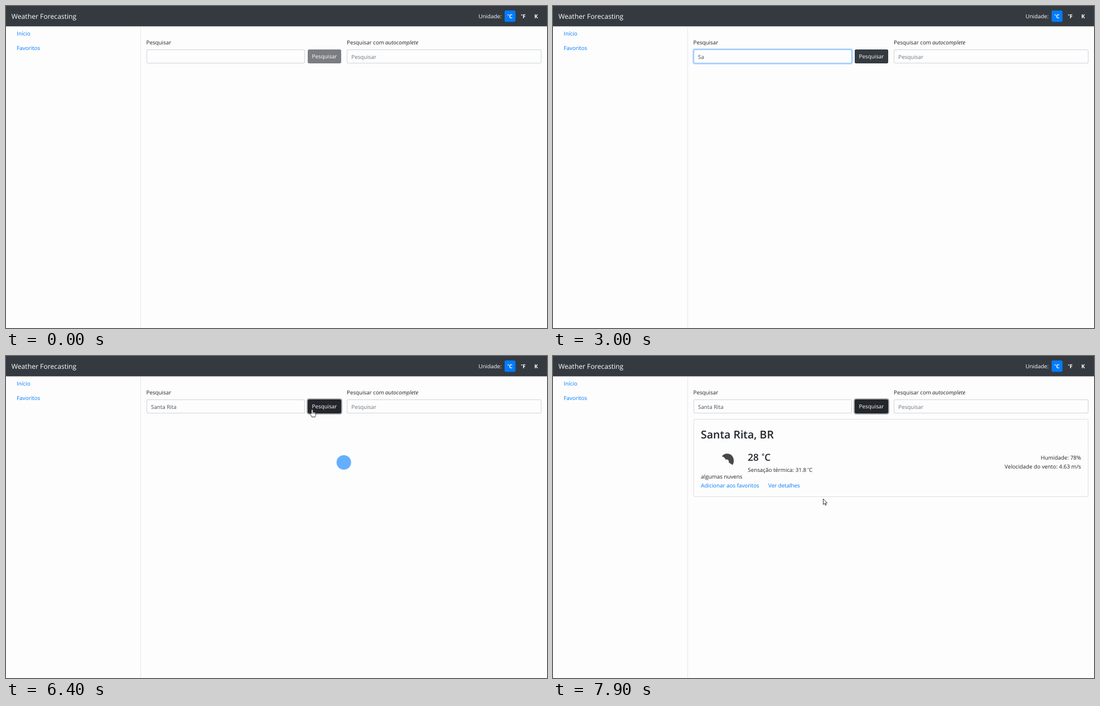
Recreate the animation shown at these times as an HTML page with a canvas. Size 970 px wide and 578 px high, loop 8 s.

```html
<!DOCTYPE html>
<html lang="pt">
<head>
<meta charset="utf-8">
<title>Weather Forecasting</title>
<style>
  html, body { margin: 0; width: 100%; height: 100%; overflow: hidden; background: #fdfdfd; }
  canvas { display: block; }
</style>
</head>
<body>
<canvas id="stage" width="970" height="578"></canvas>
<script>
const ctx = document.getElementById('stage').getContext('2d');
const LOOP = 8000, STEP = 100;
const BODY = 9.8;
const INK = '#212529', DARK = '#343a40', BLUE = '#007bff', PAGE = '#fdfdfd';

const TYPING = [
  [2400, 'S'], [2500, 'Sa'], [3500, 'S'], [3700, 'San'], [3800, 'Santa'], [4000, 'Santa '],
  [4200, 'Santa R'], [4300, 'Santa Ri'], [4400, 'Santa Rit'], [4500, 'Santa Rita']
];

// time, x, y, shape
const POINTER = [
  [0, 10.5, -11.3, 'arrow'], [400, 10.5, -11.3, 'arrow'], [600, 50, 50, 'arrow'],
  [800, 160, 140, 'arrow'], [1000, 290, 176, 'arrow'], [1200, 364, 120, 'arrow'],
  [1300, 361.5, 95, 'arrow'], [1400, 362, 91, 'beam'], [2400, 362, 91, 'none'],
  [5800, 624, 98, 'arrow'], [5900, 578, 98, 'hand'], [6000, 545, 97, 'hand'],
  [6100, 549, 96, 'hand'], [6600, 549, 96, 'hand'], [6700, 538, 112, 'arrow'],
  [6900, 504, 172, 'arrow'], [7100, 486, 210, 'arrow'], [7300, 486, 246, 'arrow'],
  [7400, 486, 246, 'arrow'], [7600, 486, 251, 'arrow'], [7800, 486, 251, 'arrow'],
  [7900, 484, 256, 'arrow'], [8000, 484, 256, 'arrow']
];

const HAND = 'M-1.3 8V1.2C-1.3-.3 1.2-.3 1.2 1.2V5C1.6 4.2 3 4.4 3.2 5.4' +
  'C3.7 4.8 4.9 5 5 6C5.6 5.6 6.4 6 6.4 7V9.6C6.4 11 5.4 11.6 5.3 13.4H-.8' +
  'C-.8 11.6-2.8 10.4-3.8 8.2C-4.2 7-2.8 6.4-2 7.3Z';
const ARROW = 'M.5.5V10.6L2.9 8.5L4.5 12L6 11.3L4.5 7.9H7.5Z';
const CLOUD = 'M303 180.3C306 174.5 316 173.5 321 179C325 184 325 191 322 195.5' +
  'L315.2 191.2C316 187.5 313 184.7 309.8 186.3C308.5 183 306 181 303 180.3Z';

const clamp = v => Math.max(0, Math.min(1, v));
const ramp = (t, start) => clamp((t - start + 60) / 150);

function text(str, x, y, color = INK, { size = BODY, weight = 400, style = 'normal', align = 'left' } = {}) {
  ctx.font = `${style} ${weight} ${size}px "Open Sans", "Noto Sans", sans-serif`;
  ctx.textAlign = align;
  ctx.fillStyle = color;
  ctx.fillText(str, x, y);
}

function unit(letter, x, y, color, size = BODY, weight = 400) {
  text('°', x, y - size * 0.22, color, { size: size * 0.72, weight });
  text(letter, x + size * 0.3, y, color, { size, weight });
}

function box(x, y, w, h, fill, r = 2.7) {
  ctx.beginPath();
  ctx.roundRect(x, y, w, h, r);
  ctx.fillStyle = fill;
  ctx.fill();
}

function outlined(x, y, w, h, border, fill = PAGE) {
  box(x, y, w, h, border);
  box(x + 1, y + 1, w - 2, h - 2, fill, 1.8);
}

function faded(alpha, draw) {
  if (alpha <= 0) return;
  ctx.save();
  ctx.globalAlpha = alpha;
  draw();
  ctx.restore();
}

function drawChrome() {
  ctx.fillStyle = PAGE;
  ctx.fillRect(0, 0, 970, 578);
  ctx.fillStyle = DARK;
  ctx.fillRect(0, 0, 970, 36.5);
  ctx.fillStyle = '#e3e6e8';
  ctx.fillRect(241, 37, 1, 541);

  text('Weather Forecasting', 9.7, 23.3, '#fff', { size: 12.2 });
  text('Unidade:', 847.3, 22.2, '#fff');
  box(894, 8, 19.5, 20.5, BLUE);
  unit('C', 899, 22.2, '#fff', BODY, 700);
  unit('F', 923.3, 22.2, '#fff', BODY, 700);
  text('K', 947.3, 22.2, '#fff', { weight: 700 });

  text('Início', 19.3, 53.3, BLUE);
  text('Favoritos', 19.3, 79.3, BLUE);
  text('Pesquisar', 251.5, 69, INK);
  text('Pesquisar com', 611, 69, INK);
  text('autocomplete', 680, 69, INK, { style: 'italic' });
  outlined(611, 78, 349, 25, '#ced4da');
  text('Pesquisar', 619.3, 94.7, '#6c757d');
}

function drawField(t) {
  outlined(252, 78, 284, 25, '#ced4da');
  const focus = ramp(t, 2000) * (1 - ramp(t, 6300));
  faded(focus, () => {
    box(250, 76, 288, 29, '#bfddfe', 4.5);
    outlined(252, 78, 284, 25, '#80bdff');
  });

  const entry = TYPING.filter(k => k[0] <= t).pop();
  const value = entry ? entry[1] : '';
  text(value, 260, 94.7, '#495057');

  const lastInput = Math.max(2000, entry ? entry[0] : 0);
  const blinkOn = Math.floor((t - lastInput) / 500) % 2 === 0;
  if (t >= 2000 && t < 6300 && blinkOn) {
    ctx.fillStyle = '#222';
    ctx.fillRect(Math.floor(260.5 + ctx.measureText(value).width), 84, 1, 14);
  }
}

function drawButton(t) {
  box(541, 78, 60, 25, '#7a7e82');
  faded(ramp(t, 2400), () => box(541, 78, 60, 25, DARK));
  faded(ramp(t, 6300), () => box(539, 76, 64, 29, '#a7aaac', 4.5));
  faded(ramp(t, 6100), () => outlined(541, 78, 60, 25, '#1d2124', '#23272b'));
  text('Pesquisar', 548.6, 94.3, '#fff');
}

function easeInOut(p) {
  // cubic-bezier(.42, 0, .58, 1) solved for its parameter
  let lo = 0, hi = 1;
  for (let i = 0; i < 24; i++) {
    const u = (lo + hi) / 2;
    const x = 1.26 * u * (1 - u) ** 2 + 1.74 * u * u * (1 - u) + u ** 3;
    if (x < p) lo = u; else hi = u;
  }
  return 3 * lo * lo - 2 * lo ** 3;
}

function drawSpinner(t) {
  if (t < 6300 || t >= 7200) return;
  const grow = easeInOut((t - 6300) / 1000);
  for (const scale of [grow, 1 - grow]) {
    faded(0.6, () => {
      ctx.beginPath();
      ctx.arc(605.7, 191, 13.33 * scale, 0, 2 * Math.PI);
      ctx.fillStyle = BLUE;
      ctx.fill();
    });
  }
}

function drawCard(t) {
  if (t < 7200) return;
  outlined(252, 113, 708, 140, '#dfdfdf');
  text('Santa Rita, BR', 265, 147.5, INK, { size: 19.5, weight: 600 });
  text('28', 349.3, 187.8, INK, { size: 17.2, weight: 600 });
  unit('C', 374, 187.8, INK, 17.2, 600);
  text('Sensação térmica: 31.8', 349.3, 207.8);
  unit('C', 456, 207.8, INK);
  text('algumas nuvens', 265.3, 220.3);
  text('Adicionar aos favoritos', 265.3, 236, BLUE);
  text('Ver detalhes', 386, 236, BLUE);
  text('Humidade: 78%', 946.7, 186.3, INK, { align: 'right' });
  text('Velocidade do vento: 4.63 m/s', 946.7, 202, INK, { align: 'right' });
  if (t >= 7300) {
    ctx.fillStyle = '#48484a';
    ctx.fill(new Path2D(CLOUD));
  }
}

function drawPointer(t) {
  const i = POINTER.findLastIndex(k => k[0] <= t);
  const [t0, x0, y0, shape] = POINTER[i];
  const [t1, x1, y1] = POINTER[i + 1];
  if (shape === 'none') return;
  const p = (t - t0) / (t1 - t0);
  ctx.save();
  ctx.translate(x0 + (x1 - x0) * p, y0 + (y1 - y0) * p);
  if (shape === 'beam') {
    ctx.fillStyle = '#ececec';
    ctx.fillRect(0, -5, 1, 11);
  } else {
    const path = new Path2D(shape === 'hand' ? HAND : ARROW);
    ctx.fillStyle = '#fff';
    ctx.fill(path);
    ctx.strokeStyle = '#222';
    ctx.lineWidth = 0.9;
    ctx.stroke(path);
    if (shape === 'hand') ctx.stroke(new Path2D('M1.2 5V7.5M3.2 5.6V7.6M5 6.2V7.8'));
  }
  ctx.restore();
}

function render(now) {
  const t = Math.floor((now % LOOP) / STEP) * STEP;
  ctx.textRendering = 'geometricPrecision';
  drawChrome();
  drawField(t);
  drawButton(t);
  drawSpinner(t);
  drawCard(t);
  drawPointer(t);
  requestAnimationFrame(render);
}

const start = performance.now();
const tick = () => performance.now() - start;
const renderFrame = render;
render = () => renderFrame(tick());
render();
</script>
</body>
</html>
```
